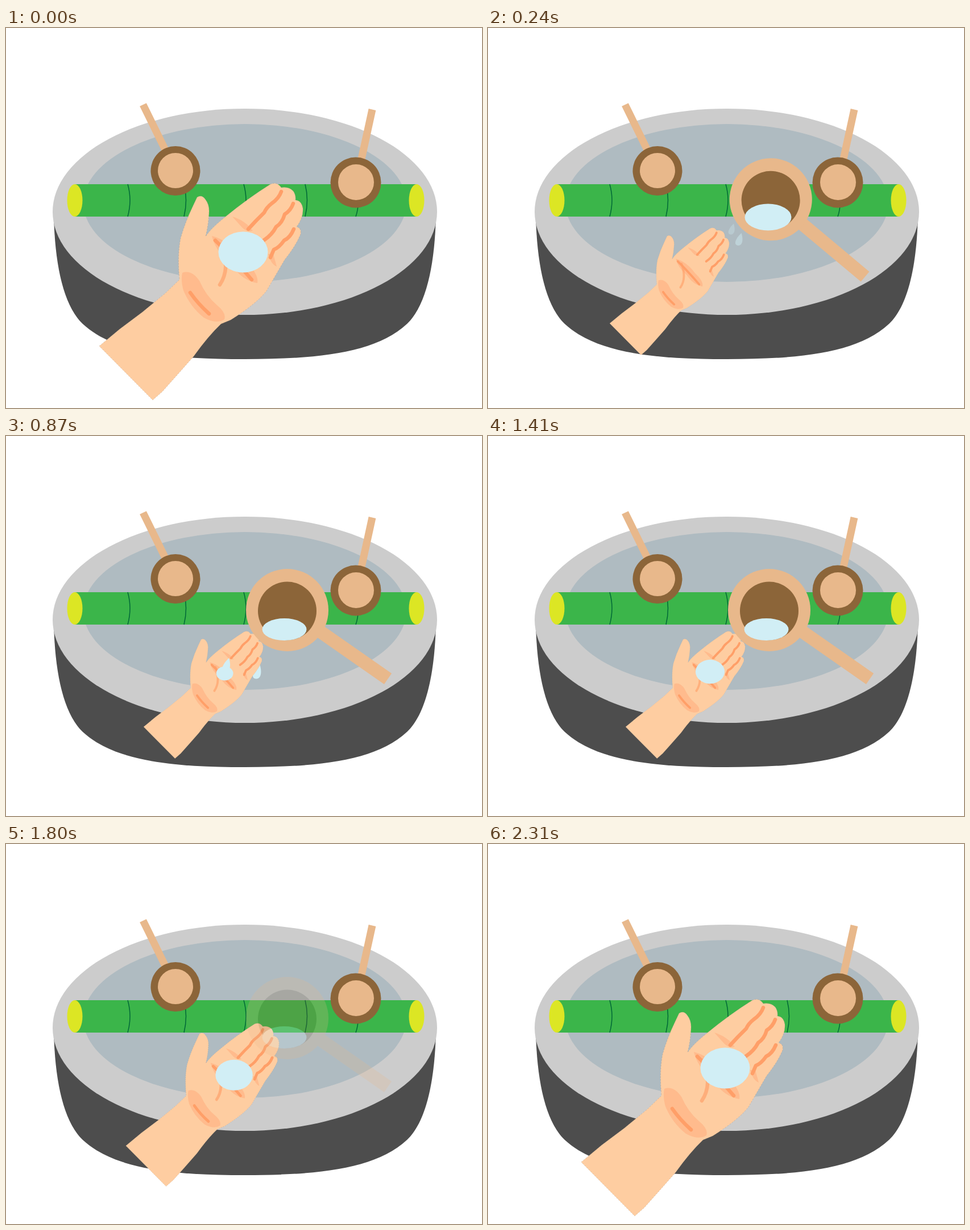
Recreate the animation shown at these times as an HTML page. Size 837 by 669 pixels, loop 2670 ms.

```html
<!DOCTYPE html>
<html lang="en">
<head>
<meta charset="utf-8">
<title>Hand washing basin</title>
<style>
  html, body { margin: 0; width: 100%; height: 100%; overflow: hidden; background: #fff; }
  svg { display: block; width: 100%; height: 100%; }
  .wood { fill: #e8b88b; }
  .brown { fill: #8c6539; }
  .water { fill: #d1eef5; }
  .stick { stroke: #e8b88b; stroke-width: 13; }
  .crease { fill: none; stroke: #ff9f68; stroke-width: 6.5; stroke-linecap: round; stroke-linejoin: round; }
  .soft { fill: #ffbb8d; }
</style>
</head>
<body>
<svg viewBox="0 0 837 669">
  <path fill="#4d4d4d" d="M84 330C86 420 102 490 135 521C190 572 290 583 420 583S650 572 705 521C738 490 754 420 756 330Z"/>
  <ellipse cx="420" cy="323.5" rx="338" ry="181.5" fill="#ccc"/>
  <ellipse cx="420" cy="308" rx="284" ry="139" fill="#afbbc1"/>

  <path fill="#3bb54a" d="M121 275H722V332H121Z"/>
  <path fill="none" stroke="#006837" stroke-width="1.5"
    d="M214 275q8 28 0 57M313 275q7 28 0 57M418 275q8 28 0 57M526 275q7 28 0 57M615 332q5-14 4-30"/>
  <g fill="#dce624">
    <ellipse cx="121" cy="303.5" rx="13.5" ry="28.5"/>
    <ellipse cx="722" cy="303.5" rx="13.5" ry="28.5"/>
  </g>

  <path class="stick" d="M241 135L298 251M644 143.500L616 272"/>
  <circle class="brown" cx="298" cy="251.500" r="43.500"/>
  <circle class="wood" cx="298" cy="251" r="31"/>
  <circle class="brown" cx="615" cy="272" r="44.500"/>
  <circle class="wood" cx="615.500" cy="271.500" r="31.500"/>

  <path id="sideDrop" class="water" d="M5-12C8-3 9 11-1 12C-11 11-7-1 5-12Z"/>

  <g id="hand">
    <path fill="#fecda1" stroke="#a8988a" stroke-opacity=".5" stroke-dasharray="2 3"
      d="M164 560L200 530L240 500L280 467L305 443Q301 400 307 370Q315 342 328 315L336 298Q344 293 350 301Q358 311 357 325Q356 347 351 367Q360 353 385 333Q425 300 465 275Q477 270 484 281Q497 279 505 287Q510 294 509 303Q520 304 522 318Q523 334 511 350Q520 352 518 363Q510 383 490 408L458 463Q440 486 395 514L378 521Q355 543 330 578L300 612L275 640L258 655Z"/>
    <path class="soft" d="M310 431Q326 425 340 445Q352 472 371 488Q388 502 384 513Q370 522 348 510Q324 491 312 462Q307 444 310 431Z"/>
    <path class="soft" d="M362 366Q395 375 420 410Q445 433 442 449Q415 445 395 415Q368 392 362 366Z"/>
    <path class="soft" d="M398 332Q412 336 424 346L434 357Q424 360 415 351ZM461 398L470 398L476 420Q466 416 461 398Z"/>
    <path class="crease" stroke-opacity=".65" d="M379 381Q395 424 376 452"/>
    <path class="crease" d="M368 374Q395 400 432 443M324 466Q338 486 357 503"/>
    <path class="crease" d="M484 288Q480 300 467 309Q458 316 454 325L440 339L426 354M505 309Q501 321 490 328Q486 343 475 350Q468 364 453 374M506 354Q500 369 489 374Q480 387 471 390L465 404"/>
    <ellipse id="puddle" class="water"/>
  </g>

  <path id="palmDrop" class="water" d="M5-12C8-3 9 11-1 12C-11 11-7-1 5-12Z"/>

  <g id="ladle">
    <g id="cup">
      <path stroke="#e8b88b" stroke-width="23" d="M540 335.500L671.500 427.500"/>
      <circle class="wood" cx="494.500" cy="306.500" r="72.500"/>
      <circle class="brown" cx="494.500" cy="308" r="51.500"/>
    </g>
    <ellipse id="cupWater" class="water"/>
  </g>
</svg>
<script>
const LOOP = 2670, STEP = 30;
const $ = id => document.getElementById(id);
const set = (id, attrs) => {
  for (const name in attrs) $(id).setAttribute(name, attrs[name]);
};
const ramp = (t, from, to) => Math.min(1, Math.max(0, (t - from) / (to - from)));
const smooth = (t, from, to) => {
  const u = ramp(t, from, to);
  return u * u * (3 - 2 * u);
};
const mix = (a, b, u) => a + (b - a) * u;

function drop(id, t, x, y, size, opacity) {
  set(id, {
    transform: `translate(${x} ${y}) scale(${size})`,
    opacity: opacity * (1 - ramp(t, 870, 1050))
  });
}

function draw(t) {
  if (t < STEP) t = LOOP;
  const enter = smooth(t, 0, 240);
  const pour = smooth(t, 240, 510);
  const grow = smooth(t, 1410, 2310);
  const fall = (t - 240) / 630;

  // The hand slides in, waits for the water, then comes closer.
  const handX = mix(mix(158, 214, enter) + 28 * pour, 164, grow);
  const handY = mix(mix(351, 343, pour), 272, grow);
  set("hand", {
    transform: `translate(${handX} ${handY}) scale(${mix(.587, 1, grow)}) translate(-164 -272)`
  });

  const fill = smooth(t, 570, 1110);
  set("puddle", {
    cx: mix(393, 417, fill), cy: mix(407, 394.5, fill),
    rx: 43.5 * fill, ry: 36 * fill
  });

  // The ladle arrives, tilts and finally fades out.
  set("ladle", {
    transform: `translate(${83 * (1 - enter)} ${-72 * (1 - enter)})`,
    opacity: 1 - ramp(t, 1410, 1910)
  });
  set("cup", { transform: `rotate(${5 * (1 - pour)} 550 336)` });
  const drain = smooth(t, 240, 750);
  set("cupWater", {
    cx: mix(492.5, 489.5, drain), cy: mix(333, 340.5, drain),
    rx: mix(41, 39, drain), ry: mix(23.5, 19.5, drain)
  });

  drop("palmDrop", t, mix(428, 387, fall), mix(354, 403, fall), mix(.8, 1, fall), ramp(t, 150, 450));
  drop("sideDrop", t, 441, mix(372, 415, fall), mix(.92, 1.05, fall), ramp(t, 90, 420));
}

function frame(now) {
  draw(Math.floor(now % LOOP / STEP) * STEP);
  requestAnimationFrame(frame);
}
requestAnimationFrame(frame);
</script>
</body>
</html>
```
